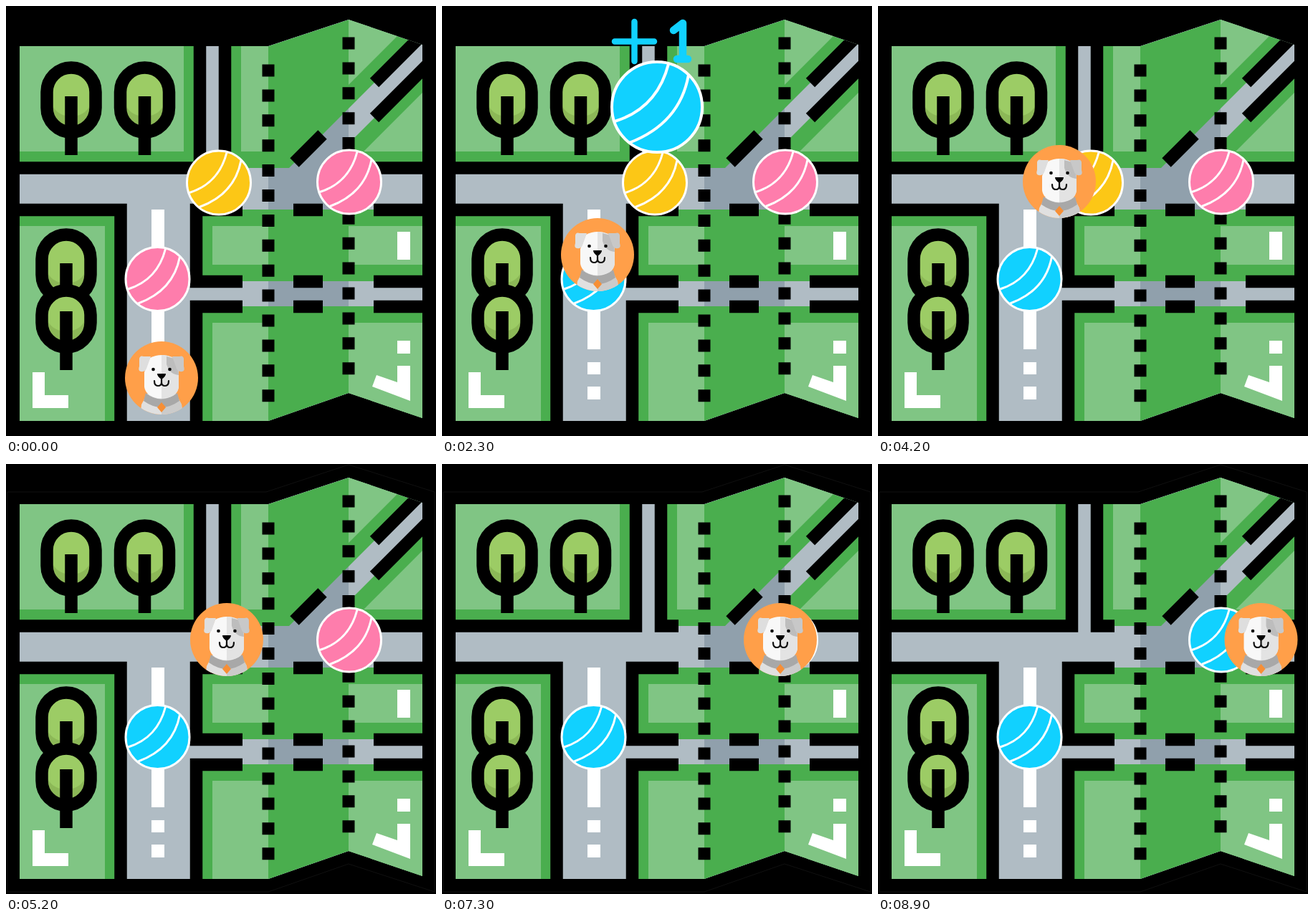
Write an HTML page that moves like this. It is 600x600 px and loops after 9000 ms.

```html
<!DOCTYPE html>
<html lang="en">
<head>
<meta charset="utf-8">
<title>Dog walk map</title>
<style>
  html, body { margin: 0; width: 100%; height: 100%; overflow: hidden; background: #000; }
  svg { display: block; width: 100vw; height: 100vh; }
  .light { fill: #80c584; }
  .mid { fill: #4aae4e; }
  .line { fill: none; stroke: #000; stroke-width: 17.5; }
  .white { fill: #fff; }
  .seam { fill: none; stroke: #fff; stroke-width: 3; }
</style>
</head>
<body>
<svg viewBox="0 0 600 600">
  <defs>
    <clipPath id="sheet"><path d="M19 56H366L478 19L581 54V575L478 540L366 579H19Z"/></clipPath>
    <clipPath id="badge"><circle r="51"/></clipPath>
    <g id="tree">
      <rect x="-34" y="-44" width="68" height="90" rx="34" fill="#8cb857"/>
      <path d="M-26-6C-26-45 26-45 26-6V9C17 29-17 29-26 9Z" fill="#9ccc65"/>
      <rect class="line" x="-34" y="-44" width="68" height="90" rx="34"/>
      <path class="line" d="M0-4V78"/>
    </g>
    <g id="ball">
      <circle r="44.5" stroke="#fff" stroke-width="3"/>
      <path class="seam" d="M11-42Q0 1-41 14M31-31Q22 16-27 34"/>
    </g>
  </defs>

  <path id="rim" d="M2 39H363L478 1L598 39V597L478 558L366 597H2Z" fill="none" stroke="#101010"/>

  <g clip-path="url(#sheet)">
    <path d="M0 0H600V600H0Z" fill="#b0bcc4"/>
    <path d="M366 0H478V600H366Z" fill="#90a0ac"/>
    <path class="mid" d="M19 56H270V226H19ZM305 56H366V226H305ZM19 284H160V579H19ZM265 284H581V384H265ZM265 419H581V600H265Z
      M366 56L478 19V143L395 226H366ZM444 226L581 89V226ZM478 19L581 54V40L478 143Z"/>
    <path class="light" d="M19 56H248V203H19ZM328 56H366V203H328ZM19 307H138V579H19ZM288 307H366V361H288ZM288 442H366V579H288Z
      M478 0H588L478 110ZM499 203L581 121V203ZM478 307H581V361H478ZM478 442H581V600H478Z"/>
    <path class="line" d="M19 226H270.5V50M305.5 50V226H330M19 284.5H160V590M330 284.5H265.5V384.5H330M330 419.5H265.5V590
      M401 284.5H442M401 384.5H442M401 419.5H442M513 226H590M513 284.5H590M513 384.5H590M513 419.5H590
      M402.5 218.5L441.5 179.5M514 107L600 21M514 156L600 70"/>
    <path d="M366 81.5V560M478 43.5V520" fill="none" stroke="#000" stroke-width="17" stroke-dasharray="17 17.9"/>
    <path class="white" d="M203 284H221V479H203ZM203 497H221V514H203ZM203 531H221V549H203ZM37 511H54V543H87V561H37Z
      M546 315H564V354H546ZM546 467H564V485H546ZM546 502H564V551L511 531L517 515L546 525Z"/>
    <use href="#tree" x="91" y="130"/>
    <use href="#tree" x="193.500" y="130"/>
    <use href="#tree" x="84" y="363"/>
    <g transform="translate(84 430)">
      <rect x="-34" y="-33" width="68" height="79" rx="34" fill="#8cb857"/>
      <path d="M-26 0C-26-33 26-33 26 0V9C17 29-17 29-26 9Z" fill="#9ccc65"/>
      <rect class="line" x="-34" y="-33" width="68" height="79" rx="34"/>
      <path class="line" d="M0-4V78"/>
    </g>
  </g>

  <use id="lowBall" href="#ball" transform="translate(211.500 381)"/>
  <use id="bonus" href="#ball" transform="translate(297 246.500)" fill="#fcc716"/>
  <use id="farBall" href="#ball" transform="translate(479 245.500)"/>

  <g id="dog">
    <circle r="51" fill="#ff9f49"/>
    <g clip-path="url(#badge)">
      <path d="M-20 22L-28 37L-30 55H30L28 37L20 22Z" fill="#e0e0e0"/>
      <path d="M0 22H20L28 37L30 55H0Z" fill="#cbcbcb"/>
      <path d="M-22 21Q0 38 22 21L25 32Q0 50-25 32Z" fill="#a8a8a8"/>
      <path d="M-16-28Q0-36 16-28L24-8V12C22 34-22 34-24 12V-8Z" fill="#f8f8f8"/>
      <path d="M0-32Q10-32 16-28L24-8V12C23 24 13 28 0 28Z" fill="#e3e3e3"/>
      <path d="M7-30L22-26L24-4Q11-5 7-19Z" fill="#bdbdbd"/>
      <path d="M-15-30L-21-13Q-23-8-29-9Q-33-10-31-16V-27Q-30-32-25-30Z" fill="#dedede"/>
      <path d="M15-30L21-13Q23-8 29-9Q33-10 31-16V-27Q30-32 25-30Z" fill="#c8c8c8"/>
      <circle cx="-11.500" cy="-12" r="2.300"/>
      <circle cx="11.500" cy="-12" r="2.300"/>
      <path d="M-6-6H6Q6-2 0 2Q-6-2-6-6Z"/>
      <path d="M0 0V6M-10 4Q-10 11-5 11Q0 11 0 6Q0 11 5 11Q10 11 10 4" fill="none" stroke="#111" stroke-width="2.200" stroke-linecap="round"/>
      <path d="M0 34L6 41L0 48L-6 41Z" fill="#f78f36"/>
    </g>
  </g>

  <g id="prize" role="img" aria-label="+1">
    <g transform="translate(300 141)" fill="#11d1ff">
      <circle r="63" stroke="#fff" stroke-width="4"/>
      <path class="seam" style="stroke-width:4" d="M16-60Q0 2-59 20M44-45Q32 23-39 50"/>
    </g>
    <g fill="none" stroke="#11d1ff" stroke-linecap="round" stroke-linejoin="round">
      <path d="M241 49.500H296M268.500 22V77" stroke-width="8.500"/>
      <path d="M323 34L336 24V73M328 74H343" stroke-width="10.500"/>
    </g>
  </g>
</svg>
<script>
const el = id => document.getElementById(id);
const [dog, lowBall, farBall, bonus, prize, rim] =
  ["dog", "lowBall", "farBall", "bonus", "prize", "rim"].map(el);
const PINK = "#fe7dac", BLUE = "#11d1ff", LOOP = 9000;
const LOW = 1900, BONUS = 4800, FAR = 7400, SHOW = 1000;

// time, x, y along the walk, with short stops
const walk = [
  [0, 217, 519], [100, 217, 519], [900, 217, 456], [2300, 217, 347],
  [3600, 217, 245], [3740, 217, 245], [4200, 253, 245], [4760, 297, 245],
  [5060, 297, 245], [6300, 394, 245], [7300, 472, 245], [8000, 534.5, 245], [LOOP, 534.5, 245]
];

function place(t) {
  const i = walk.findIndex(p => p[0] > t);
  const [t0, x0, y0] = walk[i - 1], [t1, x1, y1] = walk[i];
  const k = (t - t0) / (t1 - t0);
  return [x0 + (x1 - x0) * k, y0 + (y1 - y0) * k];
}

const show = (node, on) => node.setAttribute("visibility", on ? "visible" : "hidden");
const during = (t, start) => t >= start && t < start + SHOW;

function draw(now) {
  const t = Math.floor(now % LOOP / 100) * 100;
  dog.setAttribute("transform", `translate(${place(t)})`);
  lowBall.setAttribute("fill", t < LOW ? PINK : BLUE);
  farBall.setAttribute("fill", t < FAR ? PINK : BLUE);
  show(bonus, t < BONUS);
  show(rim, t >= BONUS);
  show(prize, during(t, LOW) || during(t, FAR));
}

const start = performance.now();
function tick() {
  draw(performance.now() - start);
  requestAnimationFrame(tick);
}
tick();
</script>
</body>
</html>
```
